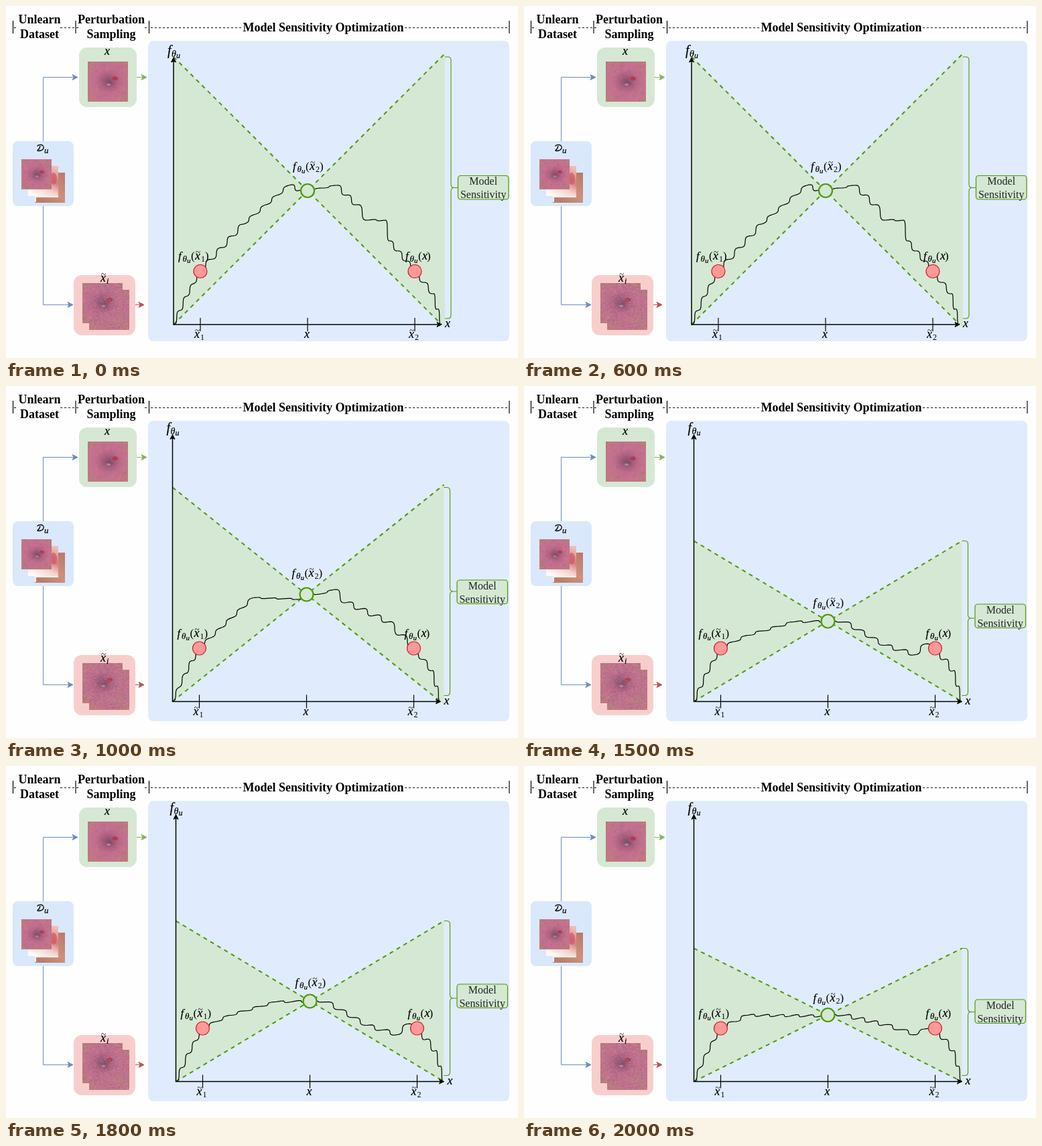
Write an HTML page that moves like this. It is 764 by 526 pixels and loops after 2500 ms.

```html
<!DOCTYPE html>
<html lang="en">
<head>
<meta charset="utf-8">
<title>Model sensitivity optimization</title>
<style>
  html, body { margin: 0; width: 100%; height: 100%; overflow: hidden; background: #fefefe; }
  svg { display: block; width: 764px; height: 526px; font-family: "Liberation Serif", "Times New Roman", serif; }
  .head { font-weight: bold; font-size: 18px; text-anchor: middle; }
  .box { font-size: 16px; text-anchor: middle; fill: #222; }
  .it { font-style: italic; stroke: #000; stroke-width: .2; }
</style>
</head>
<body>
<svg id="stage" viewBox="0 0 764 526">
  <defs>
    <radialGradient id="core"><stop offset="0" stop-color="#68465a" stop-opacity=".75"/><stop offset=".5" stop-color="#8d4d69" stop-opacity=".4"/><stop offset="1" stop-color="#a85c7b" stop-opacity="0"/></radialGradient>
    <radialGradient id="skin" cx=".52" cy=".48" r=".72"><stop offset="0" stop-color="#b7668a"/><stop offset=".6" stop-color="#c3718d"/><stop offset="1" stop-color="#b97f78"/></radialGradient>
    <linearGradient id="pale" x1=".8" y1="0" x2=".3" y2="1"><stop offset="0" stop-color="#edc0b5"/><stop offset=".4" stop-color="#d67b80"/><stop offset=".7" stop-color="#f4d3cb"/><stop offset="1" stop-color="#fff8f5"/></linearGradient>
    <linearGradient id="tan" x1="1" y1="0" x2=".3" y2="1"><stop offset="0" stop-color="#b9786b"/><stop offset=".6" stop-color="#cd917b"/><stop offset="1" stop-color="#b97e6b"/></linearGradient>
  </defs>
</svg>
<script>
const NS = "http://www.w3.org/2000/svg";
const stage = document.getElementById("stage");
const GREEN = "#4d9900", LEAF = "#d5e8d4";
let layer = stage;

function add(tag, attrs, text) {
  const el = document.createElementNS(NS, tag);
  for (const k in attrs) el.setAttribute(k, attrs[k]);
  if (text) el.textContent = text;
  return layer.appendChild(el);
}
const rect = (x, y, width, height, fill, rx = 0, more) => add("rect", { x, y, width, height, fill, rx, ...more });
const line = (d, stroke = "#000", width = 1, more) => add("path", { d, stroke, fill: "none", "stroke-width": width, ...more });
const words = (x, y, text, cls) => add("text", { x, y, class: cls }, text);
const dot = (cx, cy, color, stroke, width) => add("circle", { cx, cy, r: 10, fill: color, stroke, "stroke-width": width });
const blob = (cx, cy, rx, ry, color, opacity = 1) => add("ellipse", { cx, cy, rx, ry, fill: color, opacity });

function tip(x, y, color, turn = 0, size = 8) {
  add("path", {
    d: `M0 0L${-size} ${-size / 2}L${-size * .75} 0L${-size} ${size / 2}Z`,
    fill: color, stroke: color, transform: `translate(${x} ${y}) rotate(${turn})`
  });
}

// Each part: text, dx, dy, size, italic
function math(x, y, parts) {
  for (const [t, dx, dy, size, it] of parts)
    add("text", { x: x + dx, y: y + dy, "font-size": size, class: it ? "it" : "" }, t);
}
const xPart = dx => [["x", dx, 0, 18, 1]];
const tilde = (dx, sub) => [...xPart(dx), ["~", dx + 1, -7, 13], [sub, dx + 9, 3, 12, sub === "i"]];
const fTheta = [["f", 2, 0, 17, 1], ["θ", 8.5, 3, 13, 1], ["u", 15, 5, 11, 1]];
const call = (arg, close) => [...fTheta, ["(", 21, 0, 17], ...arg, [")", close, 0, 17]];

let seed = 7;
const rnd = () => (seed = (seed * 16807) % 2147483647) / 2147483647;

// Rough stair-like curve: across and up take turns leading between the keys
function rough(keys, ox, base) {
  const pts = [];
  for (let i = 1; i < keys.length; i++) {
    const [ax, ay] = keys[i - 1], [bx, by] = keys[i];
    const len = Math.hypot(bx - ax, by - ay), n = Math.max(1, Math.round(len / 22));
    const ripple = 1.6 * rnd();
    for (let u = 0; u < 1; u += 2 / len) {
      const w = Math.sin(2 * Math.PI * n * u), lead = .9 * w / (2 * Math.PI * n);
      const x = ax + (bx - ax) * (u + lead), y = ay + (by - ay) * (u - lead) + ripple * w;
      pts.push(`${(ox + x).toFixed(1)} ${(base - y).toFixed(1)}`);
    }
  }
  line(`M${pts.join("L")}L${ox + 400} ${base}`, "#000", 1.2, { "stroke-linejoin": "round" });
}

function specks(x, y, s, color, count, size, opacity) {
  let d = "";
  for (let i = 0; i < count; i++)
    d += `M${(x + rnd() * (s - size)).toFixed(1)} ${(y + rnd() * (s - size)).toFixed(1)}h${size}v${size}h${-size}z`;
  add("path", { d, fill: color, opacity });
}

function lesion(x, y, s, noisy) {
  rect(x, y, s, s, "url(#skin)");
  for (const color of ["#cf8297", "#a9627f"]) specks(x, y, s, color, 40, 3, .3);
  blob(x + .52 * s, y + .5 * s, .36 * s, .3 * s, "url(#core)");
  blob(x + .55 * s, y + .54 * s, .16 * s, .1 * s, "url(#core)");
  blob(x + .68 * s, y + .42 * s, .07 * s, .05 * s, "#b52f48", .8);
  blob(x + .52 * s, y + .57 * s, .05 * s, .03 * s, "#a9a3b4", .7);
  if (noisy) for (const color of ["#6f7f87", "#d79aae", "#96506f"]) specks(x, y, s, color, 300, 1, .55);
}

function header() {
  for (const x of [10.5, 104, 213.5, 751]) line(`M${x} 22V41`, "#000", 1.2);
  line("M12 32.5H18M81 32.5H103M105 32.5H108M207 32.5H212M216 32.5H351M595 32.5H750", "#000", 1, { "stroke-dasharray": "3 3" });
  words(50, 26, "Unlearn", "head");
  words(50, 48, "Dataset", "head");
  words(157, 26, "Perturbation", "head");
  words(157, 48, "Sampling", "head");
  words(473.5, 38, "Model Sensitivity Optimization", "head");
}

function arrow(d, x, y, color) {
  line(`${d}H${x - 5}`, color);
  tip(x, y, color);
}

function pipeline() {
  rect(212, 52, 539, 449, "#e0ecfd", 8);
  rect(10, 202, 91, 97, "#dae8fc", 8);
  rect(109, 62, 86, 89, LEAF, 12);
  rect(101, 402, 92, 90, "#f8cecc", 12);
  arrow("M55.5 202V106.5", 107, 106.5, "#6c8ebf");
  arrow("M55.5 299V446.5", 100, 446.5, "#6c8ebf");
  arrow("M195 106.5", 210, 106.5, "#82b366");
  arrow("M193 446.5", 206, 446.5, "#b85450");

  rect(43, 249, 45, 45, "url(#tan)");
  line("M44 284V293M43 285H78", "#fbeee8", 2);
  rect(33, 239, 45, 45, "url(#pale)");
  blob(71, 258, 5, 9, "#cf5562", .7);
  lesion(23, 229, 45);
  lesion(122, 83, 60);
  lesion(124, 424, 60, true);
  lesion(114, 414, 60, true);

  line("M46.5 209.5q2-2.500 6-2q4.500 1 3.500 5q-1.500 4-7.500 4q-2.500 0-1-1.500q2.500-1 3.500-6", "#000", 1.3);
  math(57, 219, [["u", 0, 1, 13, 1]]);
  math(147, 73, xPart(0));
  math(141, 412, tilde(0, "i"));
}

// Curve keys are measured from the origin of the axes, upwards
const steps = [
  {
    at: 0, ox: 250, base: 476, edge: 655, height: 400, box: 271,
    left: [[104, 150], [172, 208], [190, 201]],
    right: [[243, 208], [273, 179], [290, 156], [316, 156], [322, 125]]
  },
  {
    at: 1000, ox: 248.5, base: 471.5, edge: 653.5, height: 320, box: 307.5,
    left: [[120, 155], [190, 153]],
    right: [[222, 161], [240, 167], [260, 148], [322, 119]]
  },
  {
    at: 1500, ox: 253.5, base: 471.5, edge: 653.5, height: 240, box: 343.5,
    left: [[80, 99], [149, 119]],
    right: [[225, 119], [285, 84], [331, 70], [345, 86]]
  },
  {
    at: 2000, ox: 253.5, base: 471.5, edge: 653.5, height: 199, box: 366.5,
    left: [[80, 99], [190, 98]],
    right: [[225, 99], [285, 85], [332, 70], [340, 78]]
  }
];

function chart({ ox, base, edge, height, box, left, right }) {
  const cx = ox + 200, end = ox + 400, half = height / 2;
  const mid = base - half, top = base - height;
  const spread = half * (edge - cx) / 200;
  const group = layer = add("g", {});

  add("path", { d: `M${ox} ${top}L${cx} ${mid}L${ox} ${base}ZM${cx} ${mid}L${edge} ${mid - spread}V${mid + spread}Z`, fill: LEAF });
  line(`M${ox} ${base}L${edge} ${mid - spread}M${ox} ${top}L${end} ${base}`, GREEN, 2, { "stroke-dasharray": "6 6" });

  const peak = base - 399;
  line(`M${ox} ${peak + 5}V${base}H${end - 5}`, "#000", 1.5);
  tip(ox, peak, "#000", -90, 7);
  tip(end, base, "#000", 0, 7);
  for (const x of [40, 200, 360]) line(`M${ox + x} ${base - 10}v20`, "#000", 1.2);

  rough([[0, 0], [19, 42], [40, 80], ...left, [200, half], ...right, [360, 80], [387, 46], [400, 0]], ox, base);
  for (const x of [40, 360]) dot(ox + x, base - 79.5, "#ff9999", "#cc1f1f", 1.2);
  dot(cx, mid, LEAF, GREEN, 2.2);

  const low = base - 9, m = (top + low) / 2;
  line(`M${edge} ${top}h4q5 0 5 5V${m - 5}q0 5 5 5h5M${edge} ${low}h4q5 0 5-5V${m + 5}q0-5 5-5`, GREEN, 1.1);
  rect(edge + 19.5, box - 17.5, 75.5, 35.5, LEAF, 4, { stroke: GREEN, "stroke-width": 1.2 });
  words(edge + 57.2, box - 4, "Model", "box");
  words(edge + 57.2, box + 16, "Sensitivity", "box");

  const name = base - 97, centreName = mid - 20 - (height - 200) * .055;
  math(ox - 12, base - 403, [["f", 3, 0, 20, 1], ["θ", 9, 3, 14, 1], ["u", 16, 5, 12, 1]]);
  math(ox + 5, name, call(tilde(27, "1"), 42));
  math(cx - 24, centreName, call(tilde(27, "2"), 42));
  math(ox + 344, name, call(xPart(27), 34));
  math(end + 5, base + 4, xPart(0));
  math(ox + 31, base + 20, tilde(0, "1"));
  math(cx - 5, base + 20, xPart(0));
  math(ox + 351, base + 20, tilde(0, "2"));
  layer = stage;
  return group;
}

header();
pipeline();
const groups = steps.map(chart);
const start = performance.now();

function draw() {
  const t = (performance.now() - start) % 2500;
  const now = steps.filter(s => s.at <= t).length - 1;
  groups.forEach((g, i) => g.setAttribute("visibility", i === now ? "visible" : "hidden"));
  requestAnimationFrame(draw);
}
draw();
</script>
</body>
</html>
```
